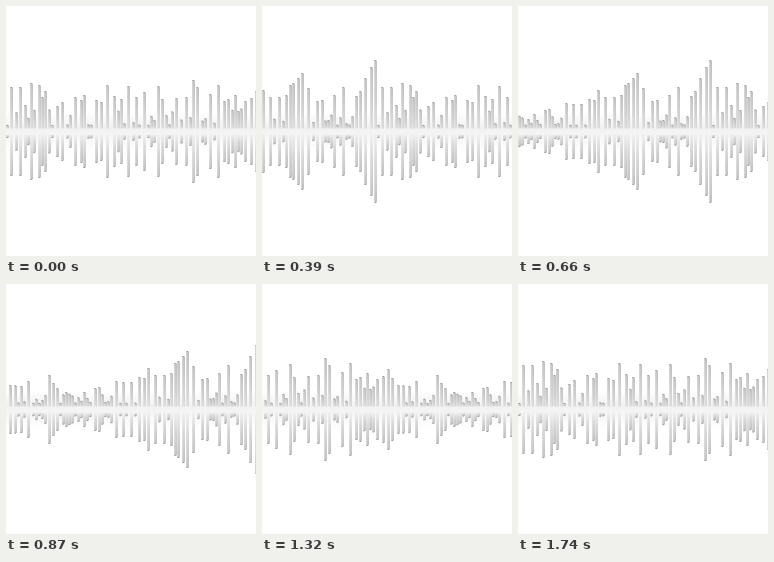
Animation of 250 by 250 pixels, one loop 1770 ms. Source, as an HTML page with a canvas:

```html
<!DOCTYPE html>
<html>
<head>
<meta charset="utf-8">
<style>
html, body { margin: 0; width: 100%; height: 100%; overflow: hidden; background: #fff; }
canvas { display: block; }
</style>
</head>
<body>
<canvas id="stage" width="250" height="250"></canvas>
<script>
const SIZE = 250, PERIOD = 512, AXIS = 125.5;
const STEP = 30, LOOP = 1770, STEPS = LOOP / STEP - 1;

// Tall bars: position along the strip, height above the axis
const peaks = [
  [5, 44], [14, 44], [19, 26], [25, 48], [33, 46], [36, 34], [39, 40], [51, 25],
  [56, 29], [69, 34], [75, 31], [78, 36], [90, 31], [95, 29], [101, 46], [108, 35],
  [115, 32], [122, 45], [130, 34], [138, 39], [152, 45], [156, 32], [170, 33], [180, 34],
  [187, 51], [191, 44], [204, 37], [212, 46], [218, 30], [222, 32], [229, 36], [239, 30],
  [245, 33], [250, 40], [254, 31], [260, 24], [278, 28], [299, 34], [303, 26], [345, 21],
  [349, 22], [366, 28], [373, 27], [381, 27], [389, 32], [394, 31], [398, 41], [405, 34],
  [414, 34], [421, 36], [425, 46], [428, 48], [433, 53], [437, 58], [443, 43], [452, 30],
  [457, 31], [469, 36], [478, 44], [491, 35], [495, 40], [500, 53], [506, 64], [510, 71]
];

let seed = 17;
function random() {
  seed = (seed * 16807) % 2147483647;
  return seed / 2147483647;
}

// Short bars fill the gaps between the tall ones
const bars = [...peaks];
for (let x = 1; x < PERIOD; x += 3) {
  const height = 6 + 18 * random() ** 1.5;
  if (peaks.every(p => Math.abs(p[0] - x) > 2)) bars.push([x, height]);
}

const strip = document.createElement('canvas');
strip.width = PERIOD;
strip.height = SIZE;
const art = strip.getContext('2d');

function drawHalf(x, height, dir) {
  const tip = AXIS - dir * height, base = AXIS - dir * 3;
  const fade = art.createLinearGradient(0, tip, 0, base);
  fade.addColorStop(0, '#808080');
  fade.addColorStop(0.6, dir > 0 ? '#a2a2a2' : '#b4b4b4');
  fade.addColorStop(1, dir > 0 ? '#c4c4c4' : '#eeeeee');
  const top = Math.min(tip, base), length = Math.abs(tip - base);
  art.fillStyle = '#f1f1f1';
  art.fillRect(x - 1, top, 2, length);
  art.fillStyle = fade;
  art.fillRect(x + 0.6, top, 0.9, length);
  art.globalAlpha = 0.4;
  art.fillRect(x - 1, top, 0.7, length);
  art.globalAlpha = 1;
  art.fillStyle = '#a0a0a0';
  art.fillRect(x - 0.6, tip - 0.5, 1.6, 1);
}

const haze = art.createLinearGradient(0, 106, 0, 145);
haze.addColorStop(0, '#fff');
haze.addColorStop(0.4, '#f1f1f1');
haze.addColorStop(0.6, '#f5f5f5');
haze.addColorStop(1, '#fff');
art.fillStyle = haze;
art.fillRect(0, 106, PERIOD, 39);
for (const [x, height] of bars) {
  drawHalf(x, height, 1);
  drawHalf(x, height, -1);
}

const ctx = document.getElementById('stage').getContext('2d');
function draw() {
  const step = Math.floor((performance.now() % LOOP) / STEP);
  const shift = Math.round(step * PERIOD / STEPS) % PERIOD;
  ctx.fillStyle = '#fff';
  ctx.fillRect(0, 0, SIZE, SIZE);
  ctx.drawImage(strip, shift, 0);
  ctx.drawImage(strip, shift - PERIOD, 0);
  requestAnimationFrame(draw);
}
draw();
</script>
</body>
</html>
```
